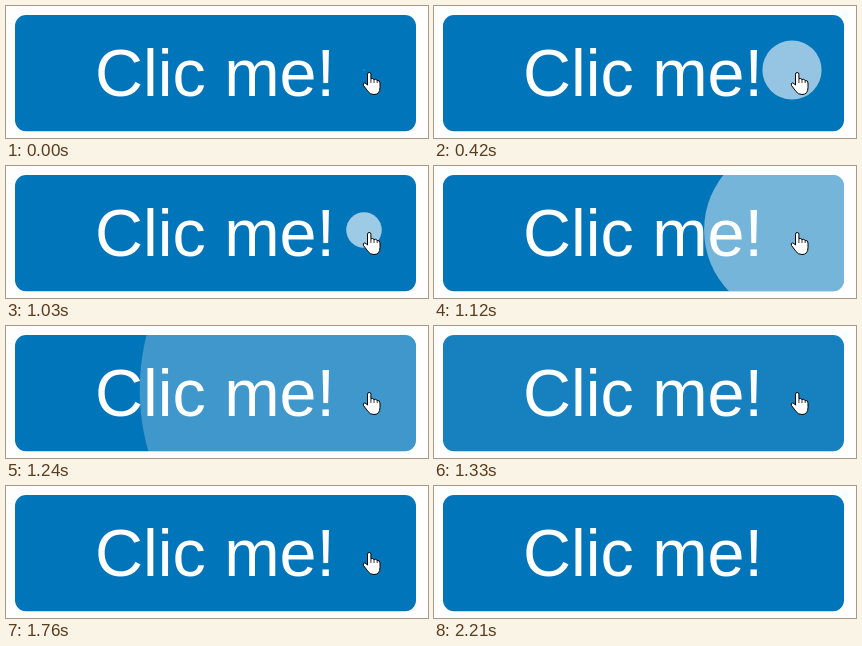
Recreate the animation shown at these times as an HTML page. Size 422 by 132 pixels, loop 3000 ms.

```html
<!DOCTYPE html>
<html lang="en">
<head>
<meta charset="utf-8">
<title>Button ripple</title>
<style>
  html, body { margin: 0; width: 100%; height: 100%; overflow: hidden; background: #fefefe; }
  svg { display: block; }
  text { font: 66.5px "Liberation Sans", Arial, sans-serif; fill: #fff; text-anchor: middle; }
</style>
</head>
<body>
<svg width="422" height="132" viewBox="0 0 422 132">
  <clipPath id="shape"><rect x="9" y="9" width="401" height="116.3" rx="11"/></clipPath>
  <g clip-path="url(#shape)">
    <rect width="422" height="132" fill="#0075ba"/>
    <g fill="#fff">
      <circle class="ripple" cx="358" cy="64"/>
      <circle class="ripple" cx="358" cy="64"/>
      <circle class="ripple" cx="358" cy="64"/>
    </g>
  </g>
  <text x="209" y="90">Clic me!</text>
  <g id="cursor" stroke="#000" stroke-linejoin="round">
    <path fill="#fff" d="M5 13V2.2Q5 .5 6.7 .5T8.4 2.2V6.8Q10 5.8 11.5 7.5Q13.3 6.6 14.7 8.4Q17.5 8.2 17.5 11V15.5Q17.5 22.5 11.5 22.5Q7.5 22.5 5.5 19.5L1 13.5Q0 11 2 11Q3.3 11 5 13Z"/>
    <path fill="none" stroke-width=".8" d="M8.4 7V11M11.5 7.5V11M14.7 8.5V11"/>
  </g>
</svg>
<script>
  const LOOP = 3000;
  const CLICKS = [0, 372, 1000];
  const FADE = 383;
  const CURSOR_LEAVES = 2180, CURSOR_GONE = 2210;
  const ripples = document.querySelectorAll(".ripple");
  const cursor = document.getElementById("cursor");

  function drawRipple(circle, age) {
    const active = age >= 0 && age < FADE;
    circle.setAttribute("r", active ? 0.521 * age + 0.0017 * age * age : 0);
    circle.setAttribute("opacity", active ? 0.67 * (1 - age / FADE) : 0);
  }

  function draw(t) {
    ripples.forEach((circle, i) => drawRipple(circle, t - CLICKS[i]));
    const leaving = t >= CURSOR_LEAVES;
    cursor.setAttribute("transform", leaving ? "translate(388 56)" : "translate(356.5 66)");
    cursor.setAttribute("visibility", t < CURSOR_GONE ? "visible" : "hidden");
  }

  const start = performance.now();
  function tick() {
    draw((performance.now() - start) % LOOP);
    requestAnimationFrame(tick);
  }
  tick();
</script>
</body>
</html>
```
